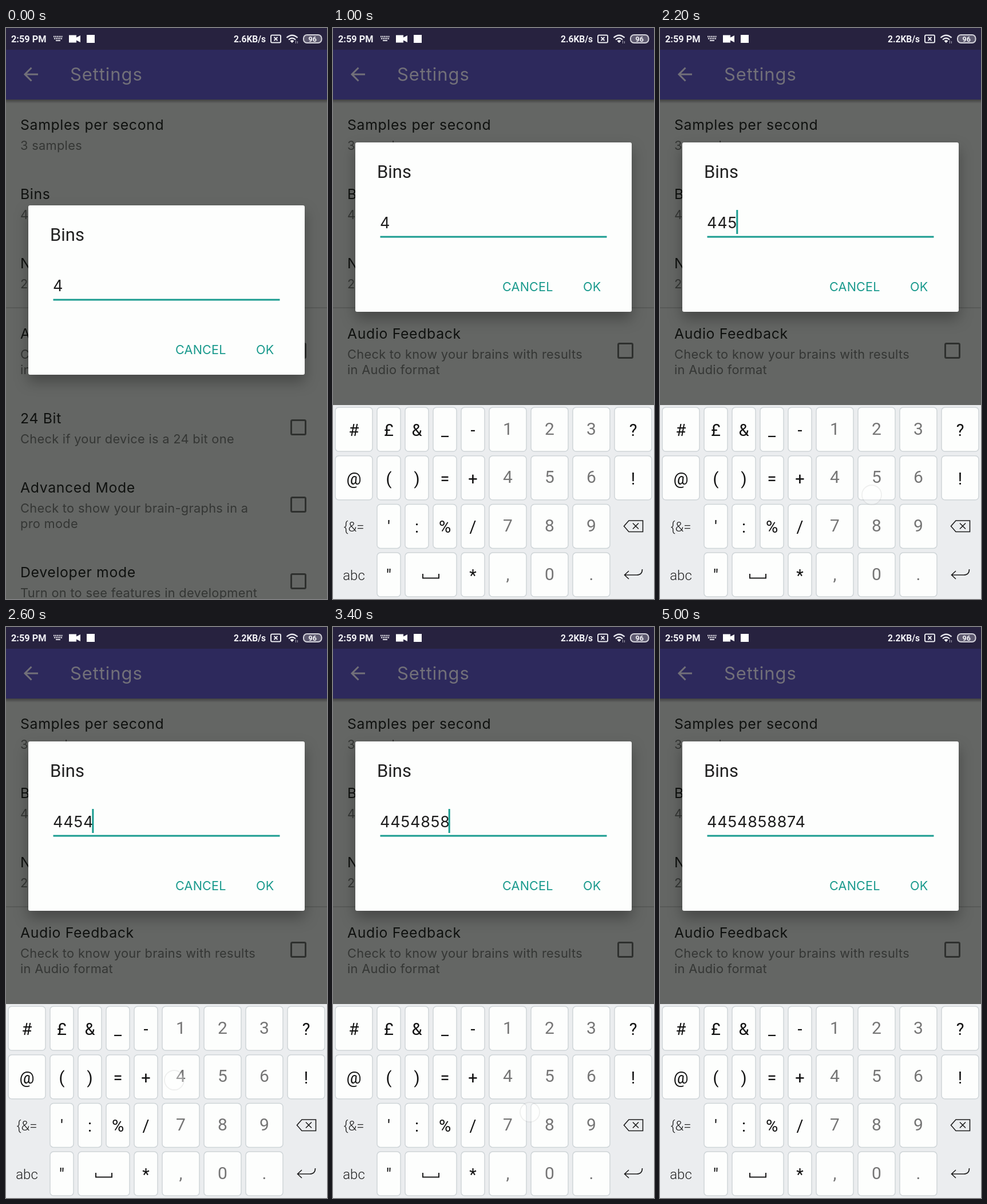
Write an HTML page that moves like this. It is 561 px wide and 998 px high and loops after 5.2 s.

```html
<!DOCTYPE html>
<html lang="en">
<head>
<meta charset="utf-8">
<title>Settings</title>
<style>
  html, body { margin: 0; width: 100%; height: 100%; overflow: hidden; background: #646664; }
  svg { display: block; width: 100%; height: 100%; }
  text { font-family: Inter, "Open Sans", sans-serif; letter-spacing: .3px; }
  .roboto text, text.roboto { font-family: Roboto, sans-serif; letter-spacing: 0; }
  .heading { font-size: 31px; fill: #727079; letter-spacing: .9px; }
  .title { font-size: 24.8px; fill: #0f110f; letter-spacing: .65px; }
  .summary { font-size: 21.8px; fill: #343634; }
  .button { font-size: 21.6px; fill: #1a9a8d; letter-spacing: .2px; }
  .check { fill: none; stroke: #2e302e; stroke-width: 3; }
  .line { fill: none; stroke-width: 2; }
  .key { fill: #fdfefd; stroke: #cfd5d8; stroke-width: 1.5; }
  .symbol { font-size: 29px; fill: #111; text-anchor: middle; }
  .digit { font-size: 30px; fill: #757575; text-anchor: middle; }
  .label { font-size: 24px; fill: #222; text-anchor: middle; font-weight: 300; }
  .status text { font-weight: 700; fill: #f2f2f6; }
  #value { font-size: 27px; fill: #1c1c1c; letter-spacing: .7px; }
  #panel { filter: drop-shadow(0 12px 12px rgba(0, 0, 0, .3)); }
</style>
</head>
<body>
<svg viewBox="0 0 561 998" preserveAspectRatio="none">
  <defs>
    <linearGradient id="shade" x2="0" y2="1">
      <stop stop-color="#000" stop-opacity=".35"/>
      <stop offset="1" stop-color="#000" stop-opacity="0"/>
    </linearGradient>
  </defs>
  <rect width="561" height="998" fill="#646664"/>
  <g id="list"></g>
  <path d="M0 489H561" stroke="#535553" stroke-width="1.5"/>

  <rect y="125" width="561" height="7" fill="url(#shade)"/>
  <rect width="561" height="125" fill="#2d295c"/>
  <rect width="561" height="38" fill="#27223f"/>
  <path d="M56 81H34M44.500 69.500L33 81l11.500 11.500" class="line" stroke="#727079" style="stroke-width:3"/>
  <text class="heading" x="112" y="92">Settings</text>

  <g class="status roboto">
    <text x="9" y="25" font-size="16.300">2:59 PM</text>
    <path d="M83 15H99M84 18.500H98" stroke="#d5d4dc" stroke-width="2.500" stroke-dasharray="2 1"/>
    <path d="M87 22H95" stroke="#d5d4dc" stroke-width="2"/>
    <path d="M110 12.500H123V16.500L130 13V25L123 21.500V25.500H110Z" fill="#fff"/>
    <rect x="141" y="12" width="14" height="14" fill="#fff"/>
    <text id="speed" x="398" y="25" font-size="15.600"></text>
    <rect x="463" y="12.500" width="17" height="13" rx="2" class="line" stroke="#e8e8ee"/>
    <path d="M468.500 16L474.500 22M474.500 16L468.500 22" class="line" stroke="#e8e8ee"/>
    <path d="M490.500 17Q500 8.500 509.500 17M494 20.500Q500 15 506 20.500" class="line" stroke="#e8e8ee" style="stroke-width:2.300"/>
    <path d="M496.500 22.500Q500 20 503.500 22.500L500 26Z" fill="#fff"/>
    <path d="M506.500 22V27M509.500 23V27" stroke="#aaa8b5"/>
    <rect x="520" y="12" width="31.500" height="14" rx="6" fill="#fff" fill-opacity=".25" stroke="#d5d4dc" stroke-width="2"/>
    <text x="535.700" y="23.500" font-size="12.500" text-anchor="middle">96</text>
  </g>

  <g id="dialog">
    <rect id="panel" x="39" width="483" height="296" rx="3" fill="#fdfefd"/>
    <text class="roboto" x="77" y="62" font-size="31" fill="#212121">Bins</text>
    <text id="value" x="82" y="150"></text>
    <path d="M82.500 165H478.500" stroke="#1a9c90" stroke-width="3"/>
    <rect id="caret" y="118" width="3" height="42" fill="#1a9c90"/>
    <text class="button" x="296" y="260">CANCEL</text>
    <text class="button" x="437" y="260">OK</text>
  </g>

  <g id="keyboard" class="roboto">
    <rect y="659" width="561" height="339" fill="#ebedef"/>
    <g id="keys"></g>
    <g fill="none" stroke="#1c1c1c" stroke-width="1.600">
      <path d="M157 954V961.500H185V954" stroke-width="2"/>
      <path d="M517 861H541.500V880.500H517L508.500 870.700ZM524 865.500L534 875.500M534 865.500L524 875.500"/>
      <path d="M540.500 946C540.500 953 537 956 531 956H509.500M517 949L509.500 956L517 963"/>
    </g>
    <circle id="touch" r="17" fill="#fff" fill-opacity=".3" stroke="#000" stroke-opacity=".06" stroke-width="1.800"/>
  </g>
</svg>
<script>
const NS = 'http://www.w3.org/2000/svg';
const byId = id => document.getElementById(id);

function add(parent, tag, attrs, text = '') {
  const node = document.createElementNS(NS, tag);
  for (const name in attrs) node.setAttribute(name, attrs[name]);
  node.textContent = text;
  parent.append(node);
}

// Title baseline, title, summary lines, checkbox centre (0 for none)
const settings = [
  [178, 'Samples per second', ['3 samples'], 0],
  [299, 'Bins', ['4'], 0],
  [420, 'N', ['2'], 0],
  [543, 'Audio Feedback', ['Check to know your brains with results', 'in Audio format'], 564],
  [691, '24 Bit', ['Check if your device is a 24 bit one'], 698],
  [812, 'Advanced Mode', ['Check to show your brain-graphs in a', 'pro mode'], 833],
  [960, 'Developer mode', ['Turn on to see features in development'], 967]
];
for (const [y, title, lines, box] of settings) {
  const list = byId('list');
  add(list, 'text', { class: 'title', x: 25, y }, title);
  lines.forEach((line, i) => add(list, 'text', { class: 'summary', x: 25, y: y + 34.500 + 27 * i }, line));
  if (box) add(list, 'rect', { class: 'check', x: 498.500, y: box - 12.500, width: 25, height: 25, rx: 2 });
}

const rows = [
  ['#', '£', '&', '_', '-', '1', '2', '3', '?'],
  ['@', '(', ')', '=', '+', '4', '5', '6', '!'],
  ['{&=', "'", ':', '%', '/', '7', '8', '9', ''],
  ['abc', '"', 'space', '', '*', ',', '0', '.', '']
];
rows.forEach((row, r) => {
  const keys = byId('keys');
  const y = 663 + 84.700 * r;
  let x = 4;
  row.forEach((key, c) => {
    const narrow = c > 0 && c < 5;
    const width = key === 'space' ? 90 : narrow ? 41 : 65;
    const plain = r > 1 && (c === 0 || c === 8);
    if (key && !plain) add(keys, 'rect', { class: 'key', x, y, width, height: 77, rx: 6 });
    const style = plain ? 'label' : c > 4 && c < 8 ? 'digit' : 'symbol';
    if (key !== 'space') add(keys, 'text', { class: style, x: x + width / 2, y: y + (style === 'symbol' ? 50 : 47.500) }, key);
    x += (narrow ? 41 : 65) + 8;
  });
});

// Start time, typed digits, caret shown, touch point
const steps = [
  [0, 1, false],
  [200, 1, true],
  [800, 1, false],
  [1400, 2, true, [294, 790]],
  [1600, 2, true],
  [2000, 2, false],
  [2200, 3, true, [370, 816]],
  [2400, 3, true],
  [2600, 4, true, [294, 792]],
  [2800, 5, true, [365, 883]],
  [3000, 6, true, [368, 812]],
  [3200, 6, true],
  [3400, 7, true, [344, 848]],
  [3600, 8, true, [365, 883]],
  [3800, 8, true],
  [4000, 9, true, [300, 878]],
  [4200, 10, true, [340, 777]],
  [4400, 10, true],
  [4600, 10, false]
];
const DURATION = 5200;
const DIGITS = '4454858874';
const show = (id, visible) => byId(id).setAttribute('visibility', visible ? 'visible' : 'hidden');

function render(time) {
  const [, count, caret, touch] = steps.findLast(step => step[0] <= time);
  const top = time < 200 ? 310 : time < 400 ? 201 : 200;
  byId('dialog').setAttribute('transform', `translate(0 ${top})`);
  byId('value').textContent = DIGITS.slice(0, count);
  byId('caret').setAttribute('x', 82 + 17.1 * count);
  byId('speed').textContent = time < 1400 ? '2.6KB/s' : '2.2KB/s';
  byId('keyboard').setAttribute('display', time < 200 ? 'none' : 'inline');
  show('caret', caret);
  show('touch', touch);
  if (touch) byId('touch').setAttribute('transform', `translate(${touch})`);
}

const start = performance.now();
function tick() {
  render((performance.now() - start) % DURATION);
  requestAnimationFrame(tick);
}
tick();
</script>
</body>
</html>
```
